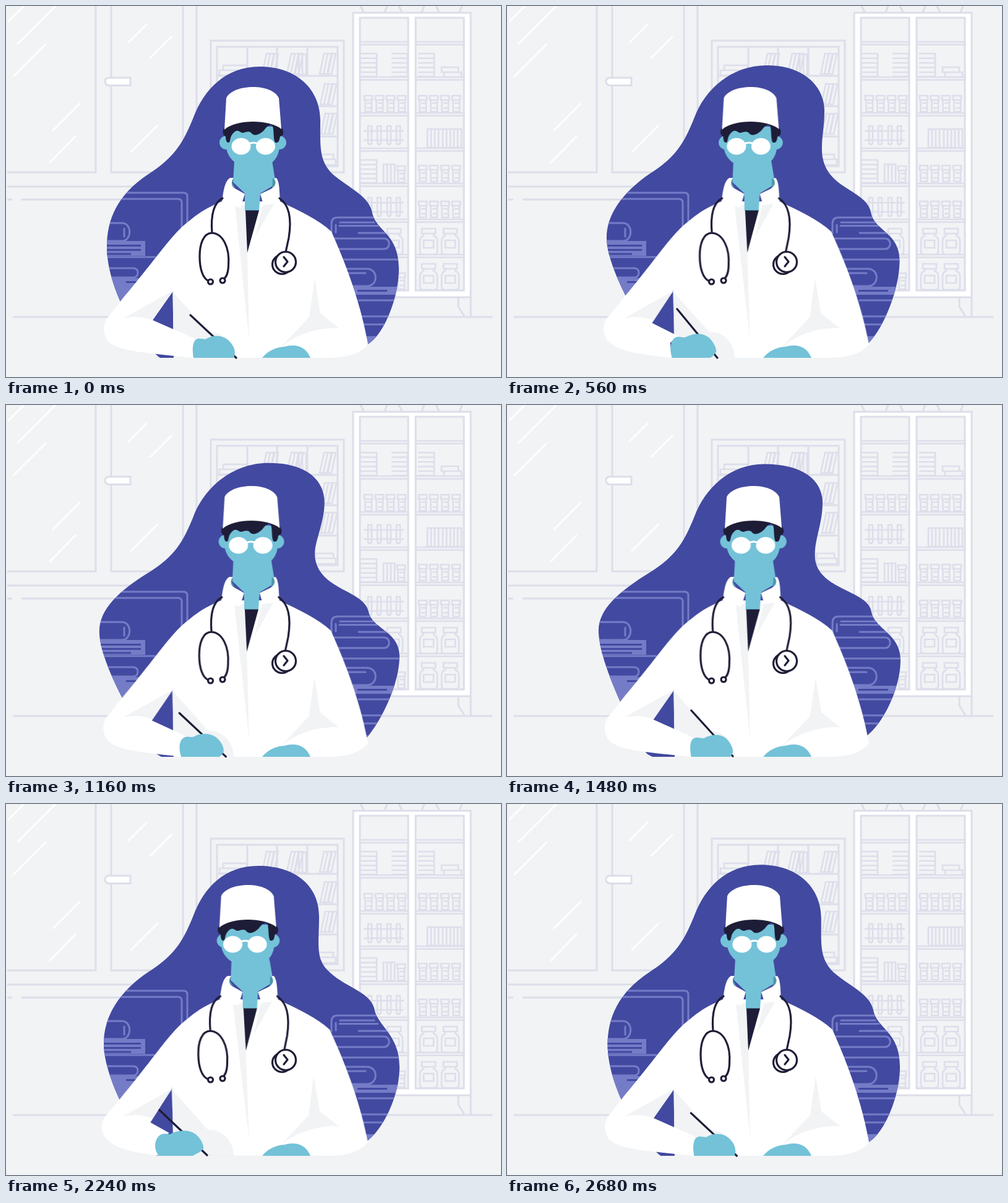
Animation, 800 px wide and 600 px high, one loop 2720 ms. Source, as an HTML page without scripts:

```html
<!DOCTYPE html>
<html lang="en">
<head>
<meta charset="utf-8">
<title>Doctor at a desk</title>
<style>
html, body { margin: 0; height: 100%; overflow: hidden; background: #f1f3f5; }
svg { display: block; width: 100%; height: 100%; }
.line { fill: none; stroke: #dddeea; stroke-width: 3; }
.thin { stroke-width: 2.6; }
.shine { fill: none; stroke: #fff; stroke-width: 2.8; stroke-linecap: round; }
.decor { fill: none; stroke: #757cc7; stroke-width: 3; stroke-linecap: round; }
.block { fill: #757cc7; }
.blue { fill: #4249a0; }
.white { fill: #fff; }
.shade { fill: #f1f3f5; }
.skin { fill: #73c2d8; }
.dark { fill: #1e1d37; }
.ink { fill: none; stroke: #1e1d37; stroke-width: 3.2; stroke-linecap: round; stroke-linejoin: round; }

.blob { animation: blob 2.72s linear infinite; }
.body, .arm, .head, .face, .ear-l, .ear-r {
  animation: lean 1.36s infinite cubic-bezier(.4,.3,.6,.7);
}
.body { animation-name: lean; transform-origin: 0 560px; }
.arm { animation-name: arm; }
.head { animation-name: head; }
.face { animation-name: face; }
.ear-l { animation-name: ear-l; }
.ear-r { animation-name: ear-r; }
.hand { animation: hand 1.36s linear infinite; }
.pen { animation: pen 1.36s linear infinite; }

@keyframes lean { 63% { transform: skewX(.82deg); animation-timing-function: ease-in-out; } }
@keyframes head { 63% { transform: translateX(-8.3px); animation-timing-function: ease-in-out; } }
@keyframes face { 63% { transform: translateX(-5.2px); animation-timing-function: ease-in-out; } }
@keyframes ear-l { 63% { transform: translateX(4px); animation-timing-function: ease-in-out; } }
@keyframes ear-r { 63% { transform: translateX(-2.5px); animation-timing-function: ease-in-out; } }
@keyframes arm {
  63% {
    d: path("M300 345C270 365 250 400 187 475L164 502C152 514 153 535 166 545C183 560 215 565 250 569L245 545L264 532L234 515L268.500 462Z");
    animation-timing-function: ease-in-out;
  }
}
@keyframes pen {
  0%, 100% { d: path("M298 500L372 569"); }
  8.8% { d: path("M298 494L365 568"); }
  23.5% { d: path("M284 493L352 569"); }
  41.2% { d: path("M275 490L340 569"); animation-timing-function: ease-out; }
  64.7% { d: path("M248 495L325 568"); animation-timing-function: ease-in-out; }
}
@keyframes hand {
  0%, 100% { d: path("M303 569C300 550 303 540 310 538C318 537 321 541 326 537C338 531 352 533 361 542C368 549 370 556 370 562C369 566 369 569 368 569Z"); }
  8.8% { d: path("M298 569C294 550 297 540 305 538C313 537 316 541 320 538C333 531 348 532 356 541C363 549 366 558 365 562C363 567 361 569 360 569Z"); }
  23.5% { d: path("M281 569C276 552 279 540 288 537C295 535 298 539 304 536C317 529 333 530 342 541C348 548 351 557 350 562C348 567 346 569 345 569Z"); }
  41.2% { d: path("M267 569C261 552 266 540 272 536C280 533 284 538 290 535C304 528 320 528 330 540C336 548 339 555 338 560C334 565 330 569 328 569Z"); animation-timing-function: ease-out; }
  64.7% { d: path("M247 569C239 560 239 545 247 537C253 531 259 534 265 534C277 527 295 526 305 533C315 540 320 552 319 557C316 563 306 566 302 569Z"); animation-timing-function: ease-in-out; }
}
@keyframes blob {
  0%, 100% { d: path("M410 98C470 98 508 135 508 185C508 225 505 250 528 272C555 295 588 308 592 335C599 365 635 368 635 425C635 470 612 530 585 547C540 580 280 600 245 566C205 530 163 450 163 390C163 345 180 305 230 272C270 246 285 225 303 180C320 135 355 98 410 98Z"); }
  11.8% { d: path("M415 97.500C475 97.500 511 135 511 180C511 222 503 248 527 273C552 296 587 306 591 335C597 365 634 368 634 418C634 465 610 525 587 546C540 580 285 600 250 564C215 528 164 430 164 380C164 340 182 304 230 272C271 246 285 225 303 180C320 135 359 97.500 415 97.500Z"); }
  29.4% { d: path("M425 94.500C485 94.500 515 125 515 160C515 195 500 225 507 256C520 300 580 300 586 335C591 362 635 365 635 405C635 450 610 510 585 541C550 585 300 600 262 560C205 500 158 410 158 370C158 335 190 300 232 270C271 245 285 225 303 180C320 135 365 94.500 425 94.500Z"); }
  41.9% { d: path("M425 93.500C485 93.500 515 120 515 158C515 195 495 225 500 250C510 300 580 300 586 335C592 362 636 366 636 405C636 450 608 508 584 537C545 580 285 600 243 563C208 515 151 415 151 367C151 330 182 301 232 270C271 245 285 225 303 180C320 135 365 93.500 425 93.500Z"); }
  54.4% { d: path("M416 95.500C476 95.500 510 120 510 158C510 195 495 220 498 250C505 300 585 300 589 335C594 362 636 370 636 412C636 455 612 508 585 532C540 575 270 600 225 563C198 515 148 415 148 365C148 330 180 302 232 270C271 245 285 225 303 180C320 135 360 95.500 416 95.500Z"); }
  70.6% { d: path("M410 99C470 99 505 125 505 172C505 215 495 245 514 268C540 297 587 298 594 332C600 362 636 370 636 420C636 465 612 518 585 541C540 580 270 600 232 568C205 530 152 440 152 385C152 340 185 302 232 270C271 245 285 225 303 180C320 135 355 99 410 99Z"); }
  82.4% { d: path("M408 100C465 100 506 130 506 182C506 225 500 248 519 268C545 296 587 302 595 330C600 360 636 372 636 425C636 470 612 522 585 544C540 580 275 600 240 566C205 530 158 440 158 388C158 343 183 303 231 271C271 245 285 225 303 180C320 135 353 100 408 100Z"); }
}
</style>
</head>
<body>
<svg viewBox="0 0 800 600">
  <defs>
    <path id="bottle" d="M0 0H13V7H0ZM1.500 7V26H12V7M4 12H12V20H4"/>
    <g id="bottles">
      <use href="#bottle"/><use href="#bottle" x="18"/><use href="#bottle" x="36"/><use href="#bottle" x="54"/>
    </g>
    <path id="jar" d="M3 0H25V8H3ZM6 8V11C2 13 0 15 0 20V37Q0 42 5 42H23Q28 42 28 37V20C28 15 26 13 22 11V8M6 19H22V31H6Z"/>
    <g id="jars"><use href="#jar"/><use href="#jar" x="35"/></g>
    <path id="stack" d="M0 0H26V37H0M0 7.500H26M0 15H26M0 22.500H26M0 30H26"/>
    <path id="tube" d="M0 0H8M1 0V26Q1 30 4 30T7 26V0"/>
    <g id="tubes">
      <use href="#tube"/><use href="#tube" x="15"/><use href="#tube" x="31"/><use href="#tube" x="46"/>
      <path d="M-6 8H59M-6 23H59"/>
    </g>
    <path id="books" d="M0 0H6V33H0ZM6 0H12V33H6ZM13 0H19V33H13Z"/>
    <path id="shelf" d="M0 0H78V4.500H0M89 0H168V4.500H89"/>
    <clipPath id="blobClip">
      <path class="blob" d="M410 98C470 98 508 135 508 185C508 225 505 250 528 272C555 295 588 308 592 335C599 365 635 368 635 425C635 470 612 530 585 547C540 580 280 600 245 566C205 530 163 450 163 390C163 345 180 305 230 272C270 246 285 225 303 180C320 135 355 98 410 98Z"/>
    </clipPath>
  </defs>

  <rect class="shade" width="800" height="600"/>

  <!-- window -->
  <g class="line">
    <path d="M145 0V269H2M170 0V269H286V0M308 0V292M2 292H320M2 313H10M25 313H340M11 503H786"/>
    <path class="white" d="M201 116H167Q160 116 160 122T167 128.500H201Z"/>
  </g>
  <path class="shine" d="M4 25L29 0M19 61L80 0M12 114L64 62M198 59L227 30M233 84L267 50M76 201L119 158M71 253L112 211M202 236L245 193"/>

  <!-- bookcase -->
  <g class="line">
    <path d="M331 56H546V269H331ZM341 66H536V259H341ZM390 66V113M438 66V113M487 66V113M341 113H536M341 162H536M341 211H536"/>
    <g class="thin">
      <path d="M351 96H389V104H351ZM345 104H389V112H345ZM473 78H479V111H473ZM479 78H485V111H479ZM500 240H529V248H500ZM500 248H533V257H500Z"/>
      <use href="#books" transform="translate(421 77) skewX(-12)"/>
      <use href="#books" transform="translate(461 77) skewX(-12)"/>
      <use href="#books" transform="translate(514 77) skewX(-12)"/>
      <use href="#books" transform="translate(515 126) skewX(-12)"/>
      <use href="#books" transform="translate(516 174) skewX(-12)"/>
    </g>
  </g>

  <!-- cabinet -->
  <g class="line">
    <path d="M573 0L578 10M616 0L612 10M635 0L640 10M676 0L672 10M695 0L700 10M737 0L733 10M731 471V486L741 502M751 471V502"/>
    <rect class="white" x="561" y="11" width="190" height="460"/>
    <path class="shade" d="M572 19H650V460H572ZM662 19H740V460H662Z"/>
    <g class="thin">
      <use href="#shelf" x="572" y="58"/><use href="#shelf" x="572" y="115"/>
      <use href="#shelf" x="572" y="173"/><use href="#shelf" x="572" y="230"/>
      <use href="#shelf" x="572" y="287"/><use href="#shelf" x="572" y="345"/>
      <use href="#shelf" x="572" y="402"/>
      <use href="#stack" x="573" y="77"/><use href="#stack" x="623" y="77"/><use href="#stack" x="666" y="77"/>
      <path d="M704 99H731V107H704ZM708 107H736V115H708Z"/>
      <use href="#bottles" x="579" y="145"/><use href="#bottles" x="667" y="145"/>
      <use href="#tubes" x="584" y="194"/>
      <path d="M681 199H736V229H681ZM687 199V229M693 199V229M699 199V229M706 199V229M712 199V229M718 199V229M724 199V229M730 199V229"/>
      <use href="#stack" x="573" y="249"/>
      <path d="M610 256H628V286H610ZM616 256V286M622 256V286"/>
      <use href="#bottle" x="632" y="259"/><use href="#bottles" x="667" y="258"/>
      <use href="#tubes" x="584" y="310"/><use href="#bottles" x="667" y="316"/>
      <use href="#jars" x="578" y="360"/><use href="#jars" x="669" y="360"/>
      <use href="#bottles" x="578" y="432"/><use href="#jars" x="669" y="417"/>
    </g>
  </g>

  <!-- backdrop -->
  <g clip-path="url(#blobClip)">
    <rect class="blue" x="100" y="80" width="560" height="489"/>
    <path class="decor" d="M140 302H287Q293 302 293 308V360M140 312H278Q284 312 284 318V370M140 351H187C204 351 204 380 187 380H140M191 360V373M140 406H241M140 424H205Q213 424 213 431.500T205 439H140"/>
    <path class="block" d="M140 380H225V404H140ZM140 440H216V510H140Z"/>
    <path class="blue" d="M140 386H218V389H140ZM140 393H218V396H140ZM140 399.500H202V402.500H140ZM194 445H220V448H194Z"/>
    <path class="decor" d="M598 342H536Q526 342 526 352V368M533 366V354M540 350H595M539 355.500H601M570 367H640M530 376H611C622 376 622 393 611 393H530M540 410H640M545 425H583C602 425 602 453 583 453H550M545 432H581M570 476H640M570 502H640M570 515H640"/>
    <path class="block" d="M560 454H640V467H560ZM570 534H602V546H570Z"/>
    <path class="blue" d="M568 459H616V462H568Z"/>
  </g>

  <!-- doctor -->
  <g class="body">
    <path class="white" d="M349 316C320 328 290 345 265 385L269.500 462L271 569H520C555 569 575 560 585 547C575 490 555 430 526 365C505 345 475 332 443 316Z"/>
    <path class="shade" d="M269.500 462L327 527C350 526 368 545 368 569H271Z"/>
    <path class="arm white" d="M300 345C270 365 250 400 187 475L166 502C155 514 156 535 168 545C185 558 225 561 303 569L303 545L305 538L237 508L269.500 462Z"/>
    <path class="shade" d="M190 505L269.500 461L237 508C221 502 206 502 190 505ZM499 440L508 497L538 521C503 520 472 530 446 550L490 503ZM370 322L386 322L390 400L393 541ZM415 322L433 320L403 373Z"/>
    <path class="skin" d="M369 250L367 285L386 303V331H409L411 303L436 288L430 250Z"/>
    <path fill="#4a97a9" d="M367 279C362 284 364 291 371 295L366 286ZM431 279L430 295C437 291 438 284 435 279Z"/>
    <path class="dark" d="M387 330.500H409L390 399Z"/>
    <path class="white" d="M362 278C355 283 352 292 349 318L379 326L386 304L370 295C363 291 364 283 368 278ZM437 278C441 284 442 290 443 318L416 321L411 304L428 296C437 291 437 284 433 279Z"/>
    <path class="ink" d="M350 311C334 319 331 342 333 367M442 311C460 323 461 350 457 375L452 398M328 445C318 441 313 425 313 405C313 385 319 367 333 367C350 368 362 390 359.500 420C359 433 355 440 351 442"/>
  </g>
  <g class="ink">
    <circle class="white" cx="330.500" cy="446" r="4"/>
    <circle class="white" cx="350" cy="444" r="4"/>
    <circle class="white" cx="446" cy="418" r="15.500"/>
    <circle class="white" cx="452" cy="414" r="16.500"/>
    <path d="M449 406L455 413.500L449 421"/>
  </g>

  <g class="head">
    <circle class="ear-l skin" cx="356" cy="221" r="11"/>
    <circle class="ear-r skin" cx="442" cy="221" r="11"/>
    <path class="skin" d="M356 195H442V228C440 250 425 262 400 262C373 262 357 245 356 228Z"/>
    <path class="dark" d="M353 197C349 202 350 209 355 211Q355 221 360 221C364 219 360 211 370 203C377 199 378 206 384 205C390 203 394 202 398 207C403 211 411 207 417 201C423 193 427 191 430 193C434 197 431 219 436 221C442 222 442 214 443 211C450 209 449 201 445 196C425 180 373 180 353 197Z"/>
    <path class="white" d="M356 149C366 126 430 124 441 149L445 199C425 183 372 183 353 200Z"/>
    <g class="face">
      <ellipse class="white" cx="380" cy="227" rx="15.500" ry="13.500"/>
      <ellipse class="white" cx="419.500" cy="227" rx="15.500" ry="13.500"/>
      <path class="shine" d="M393 223Q400 219 407 223"/>
    </g>
  </g>

  <path class="pen ink" d="M298 500L372 569"/>
  <path class="hand skin" d="M303 569C300 550 303 540 310 538C318 537 321 541 326 537C338 531 352 533 361 542C368 549 370 556 370 562C369 566 369 569 368 569Z"/>
  <path class="skin" d="M414 569C424 557 436 552 450 551C466 546 484 549 492 569Z"/>
</svg>
</body>
</html>
```
